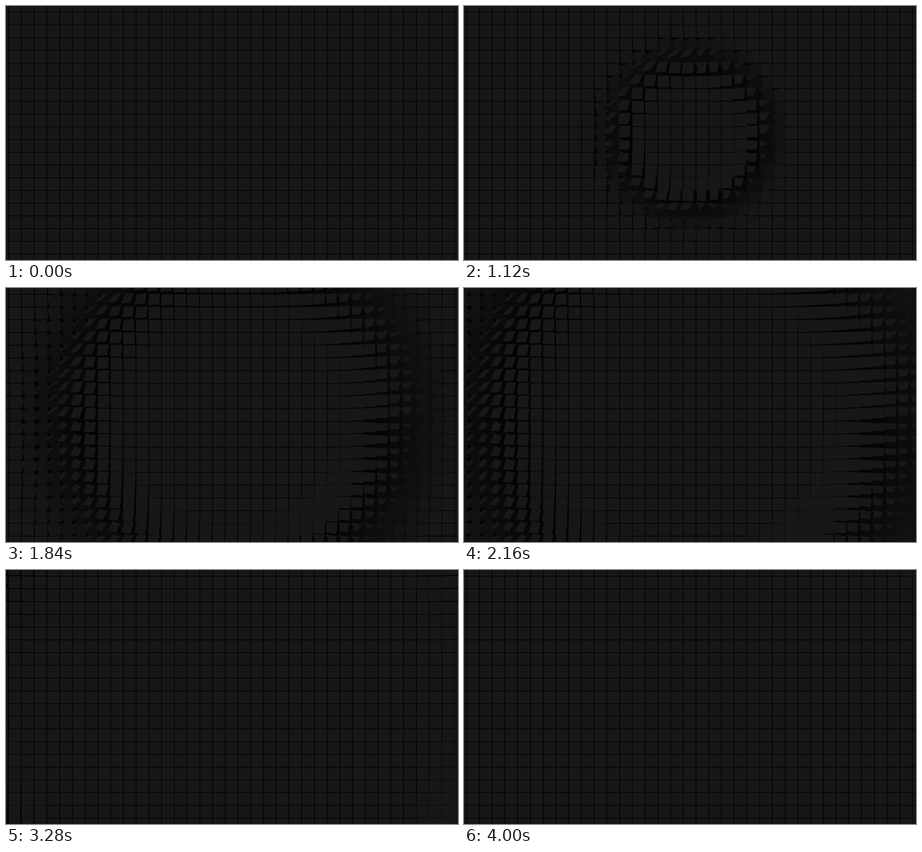
An HTML page with a canvas that plays this animation: 720 px wide and 405 px high, repeating every 4.04 s.

```html
<!DOCTYPE html>
<html lang="en">
<head>
<meta charset="utf-8">
<title>Cube ripple</title>
<style>
html, body { margin: 0; width: 100%; height: 100%; overflow: hidden; background: #040404; }
canvas { display: block; width: 720px; height: 405px; }
</style>
</head>
<body>
<canvas id="stage" width="720" height="405"></canvas>
<script>
const ctx = document.getElementById("stage").getContext("2d");
const LOOP = 4040, STEP = 40;
const CX = 359.4, CY = 202.8, PITCH = 20.29;
const HALF = 9.55, CAMERA = 720;
const LIGHT = [-0.4, -0.4, 0.9];
const DARK = 4, TONE = 23;
const QUARTER = Math.PI / 2, STILL = 0.015;

const clamp = v => Math.max(0, Math.min(1, v));
const smooth = v => { v = clamp(v); return v * v * (3 - 2 * v); };
const grey = v => `rgb(${v},${v},${v})`;

// Six faces: normal and the two half-edges spanning it.
const X = [HALF, 0, 0], Y = [0, HALF, 0], Z = [0, 0, HALF];
const faces = [];
for (const [n, u, v] of [[Z, X, Y], [X, Y, Z], [Y, Z, X]]) {
  for (const s of [1, -1]) faces.push({ n: n.map(k => k * s), u, v });
}

// Outer cubes are painted first, since inner ones stand in front of them.
const cubes = [];
for (let row = -10; row <= 10; row++) {
  for (let col = -18; col <= 18; col++) {
    const x = col * PITCH, y = row * PITCH;
    cubes.push({ x, y, dist: Math.hypot(x, y) });
  }
}
cubes.sort((a, b) => b.dist - a.dist);

const waveRadius = t => 750 * smooth(t / 3600) + 150 * smooth((t - 3000) / 1000);

function turn(radius, dist) {
  if (radius <= 0) return 0;
  return QUARTER * smooth((1 - dist / radius) / 0.57);
}

// Roll to the left, then heading to the right, both by the same angle.
function rotate([x, y, z], c, s) {
  const x1 = x * c + y * s, y1 = y * c - x * s;
  return [x1 * c + z * s, y1, z * c - x1 * s];
}

function shade(n) {
  const dot = n[0] * LIGHT[0] + n[1] * LIGHT[1] + n[2] * LIGHT[2];
  return grey(Math.round(DARK + (TONE - DARK) * clamp(dot / (HALF * LIGHT[2]))));
}

function drawCube(cube, angle) {
  const c = Math.cos(angle), s = Math.sin(angle);
  for (const face of faces) {
    const n = rotate(face.n, c, s);
    const px = cube.x + n[0], py = cube.y + n[1], pz = n[2] - HALF;
    if (n[2] * (CAMERA - pz) - n[0] * px - n[1] * py <= 0) continue;

    const u = rotate(face.u, c, s), v = rotate(face.v, c, s);
    ctx.fillStyle = shade(n);
    ctx.beginPath();
    for (const [a, b] of [[-1, -1], [1, -1], [1, 1], [-1, 1]]) {
      const k = CAMERA / (CAMERA - pz - a * u[2] - b * v[2]);
      ctx.lineTo(CX + (px + a * u[0] + b * v[0]) * k, CY + (py + a * u[1] + b * v[1]) * k);
    }
    ctx.fill();
  }
}

function draw(t) {
  ctx.fillStyle = grey(DARK);
  ctx.fillRect(0, 0, 720, 405);
  const radius = waveRadius(t);
  // At rest only the fronts show, so the grid lines stay dark and even.
  for (const cube of cubes) {
    const angle = turn(radius, cube.dist);
    if (angle > STILL && angle < QUARTER - STILL) {
      drawCube(cube, angle);
    } else {
      ctx.fillStyle = grey(TONE);
      ctx.fillRect(CX + cube.x - HALF, CY + cube.y - HALF, HALF * 2, HALF * 2);
    }
  }
}

const start = performance.now();
function tick() {
  const t = (performance.now() - start) % LOOP;
  draw(Math.floor(t / STEP) * STEP);
  requestAnimationFrame(tick);
}
tick();
</script>
</body>
</html>
```
